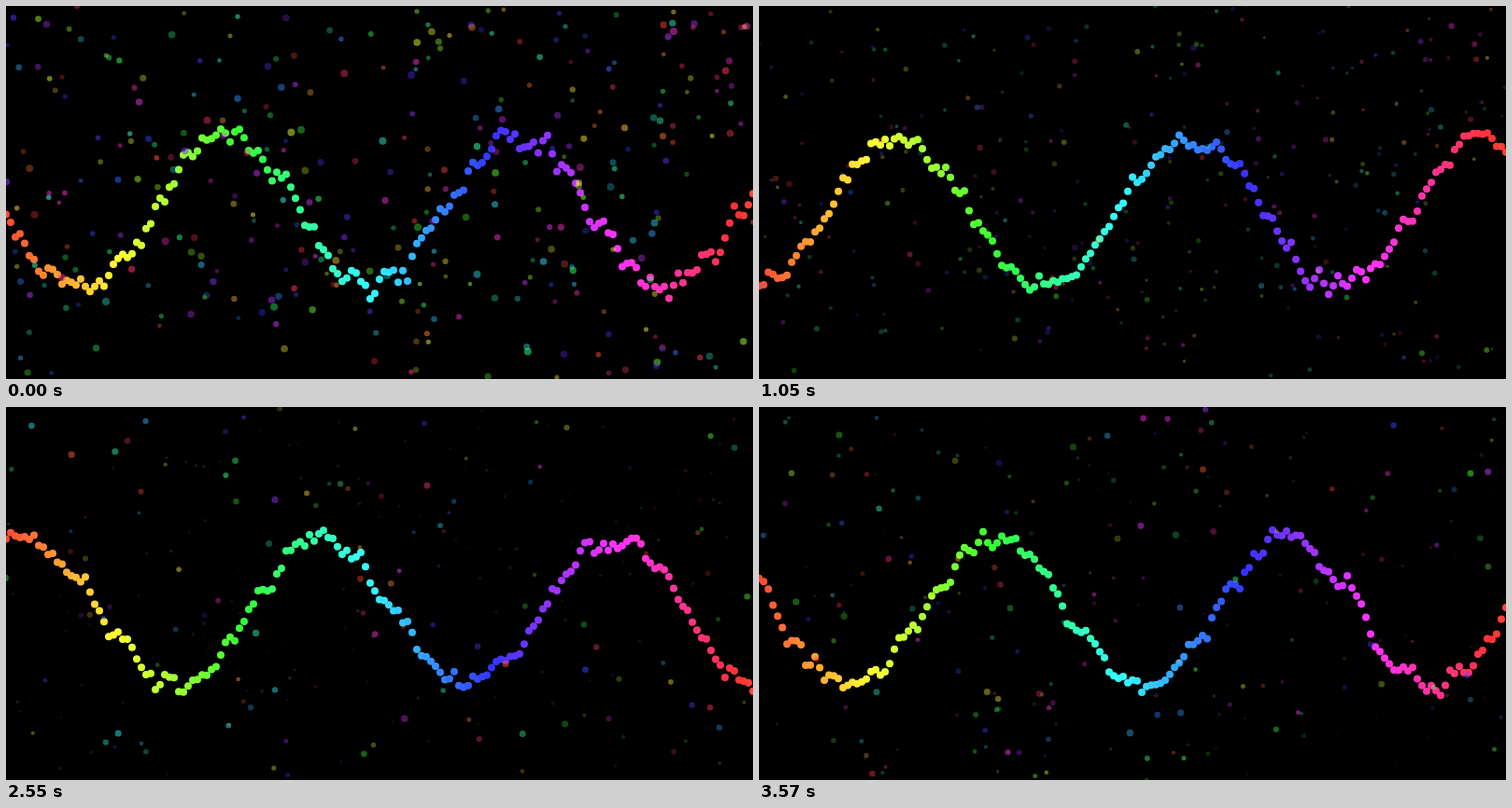
These frames come from a looping animation (800x400 px, 3.6 s). An HTML page with a canvas:

```html
<!DOCTYPE html>
<html lang="en">
<head>
<meta charset="utf-8">
<title>Rainbow wave</title>
<style>
  html, body { margin: 0; width: 100%; height: 100%; overflow: hidden; background: #000; }
  canvas { display: block; }
</style>
</head>
<body>
<canvas id="stage" width="800" height="400"></canvas>
<script>
const W = 800, H = 400;
const STEP = 30, LOOP = 3600;
const SPARKS = 340;
const ctx = document.getElementById('stage').getContext('2d');

// Repeatable pseudo-random value in 0..1 for a pair of integers
function hash(a, b) {
  let h = Math.imul(a + 101, 374761393) ^ Math.imul(b + 57, 668265263);
  h = Math.imul(h ^ (h >>> 13), 1274126177);
  h = Math.imul(h ^ (h >>> 15), 2246822519);
  return ((h ^ (h >>> 16)) >>> 0) / 4294967296;
}

const mix = (a, b, k) => a + (b - a) * k;
const ease = k => (1 - Math.cos(k * Math.PI)) / 2;

function lattice(x, y) {
  const i = Math.floor(x), j = Math.floor(y);
  const u = ease(x - i), v = ease(y - j);
  return mix(mix(hash(i, j), hash(i + 1, j), u),
             mix(hash(i, j + 1), hash(i + 1, j + 1), u), v);
}

// Four octaves, each half as strong as the one before
function noise(x, y) {
  let sum = 0;
  for (let o = 0, amp = 0.5; o < 4; o++, amp /= 2) {
    sum += amp * lattice(x * 2 ** o, y * 2 ** o + o * 40);
  }
  return sum;
}

function dot(x, y, r, hue, alpha) {
  ctx.globalAlpha = alpha;
  ctx.fillStyle = `hsl(${hue}, 100%, 60%)`;
  ctx.beginPath();
  ctx.arc(x, y, r, 0, Math.PI * 2);
  ctx.fill();
}

function drawWave(n) {
  for (let x = 0; x <= W; x += 5) {
    const y = 198 + 79 * Math.sin(x * 0.02 + n * 0.05) + 48 * noise(x * 0.1, n * 0.05);
    dot(x, y, 4, x * 0.45 + 6, 1);
  }
}

// Each spark drifts, shrinks and fades, then is reborn elsewhere
function drawSparks(n) {
  for (let i = 0; i < SPARKS; i++) {
    const span = mix(64, 138, hash(i, 900));
    const life = Math.floor(n / span);
    const age = n - life * span;
    const left = 1 - age / span;
    const rand = k => hash(i, 1000 + life * 20 + k);
    const x = rand(0) * W + (rand(1) * 2 - 1) * age;
    const y = rand(2) * H + (rand(3) * 2 - 1) * age;
    const r = mix(2.3, 4, rand(4)) * (0.25 + 0.75 * left);
    dot(x, y, r, rand(5) * 360, mix(0.27, 0.54, rand(6)) * left);
  }
}

function render(ms) {
  const n = Math.floor((ms % LOOP) / STEP);
  ctx.globalAlpha = 1;
  ctx.fillStyle = '#000';
  ctx.fillRect(0, 0, W, H);
  drawWave(n);
  drawSparks(n);
}

const start = performance.now();
function tick() {
  render(performance.now() - start);
  requestAnimationFrame(tick);
}
tick();
</script>
</body>
</html>
```
